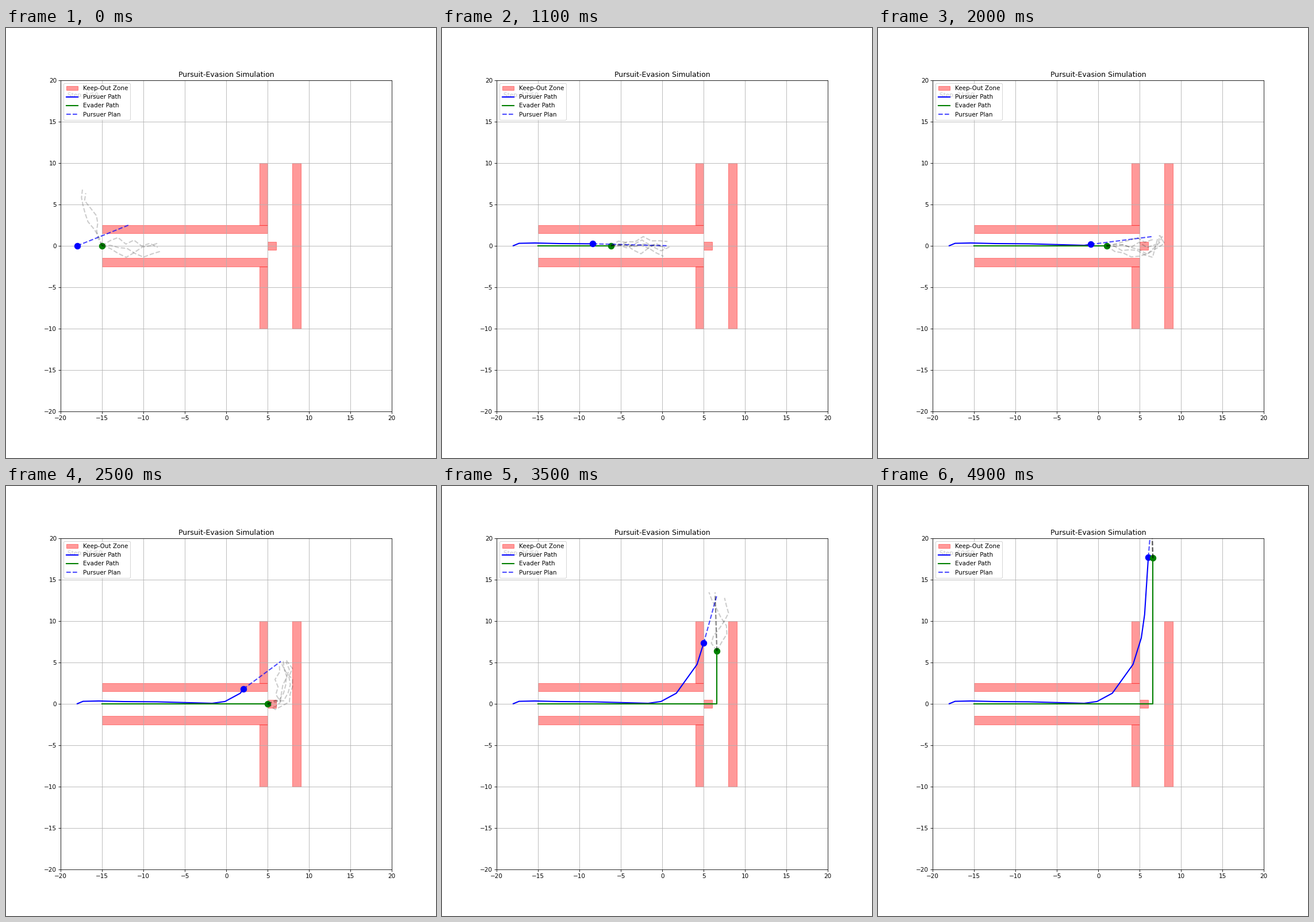
A matplotlib script that plays this animation: 748 px wide and 748 px high, repeating every 5 s.

```python
import numpy as np
import matplotlib.pyplot as plt
from matplotlib.animation import FuncAnimation
from matplotlib.patches import Rectangle

SIZE = 748
STEPS = 50
SPEED = 0.8
CORNER_STEP = 27      # the evader turns from the corridor into the shaft
OPEN_STEP = 37        # the evader nears the open end of the shaft
HORIZON = 8.4         # steps that both players look ahead
OPTIONS = 5

# Walls: x, y, width, height
ZONES = [(-15, 1.5, 20, 1), (-15, -2.5, 20, 1), (4, 2.5, 1, 7.5),
         (4, -10, 1, 7.5), (8, -10, 1, 20), (5, -0.5, 1, 1)]

# Pursuer key points: step, x, y
CHASE = np.array([
    (0, -18, 0), (1, -17.3, .29), (3, -15.4, .33), (6, -12.45, .26),
    (11, -8.38, .23), (19, -1.7, .05), (21, -.15, .27), (24, 1.7, 1.27),
    (27, 2.8, 2.8), (31, 4.2, 4.75), (36, 5.2, 7.95), (40, 5.6, 10.78),
    (49, 6.05, 17.72)])


def chase(steps):
    """Pursuer positions along its key points."""
    return np.column_stack([np.interp(steps, CHASE[:, 0], CHASE[:, k])
                            for k in (1, 2)])


def route(steps):
    """Evader positions: along the corridor, then up the shaft."""
    dist = SPEED * np.asarray(steps, float)
    turn = SPEED * CORNER_STEP
    return np.column_stack([np.minimum(dist, turn) - 15,
                            np.maximum(dist - turn, 0)])


def pursuer_goal(step):
    """The evader's expected position; the first guess swings wide."""
    return route([step + HORIZON])[0] + np.exp(-step) * np.array((-3.5, 2.5))


def drift(rng, count):
    """Sideways random walk between the walls, starting at zero."""
    side = np.zeros(count)
    for k in range(1, count):
        side[k] = np.clip(.9 * side[k - 1] + rng.uniform(-.7, .7), -1.4, 1.4)
    return side


def evader_options(step):
    """Possible escapes: wide in the corridor, straight in the open."""
    rng = np.random.default_rng(step)
    straight = np.clip((step - 22) // 4, 0, OPTIONS)
    options = []
    for k in range(OPTIONS):
        ahead = step + np.linspace(0, rng.uniform(7.8, 8.9), 8)
        upward = ahead >= CORNER_STEP
        base = route(ahead)
        if k < straight:
            side = .025 * (ahead - step)
        else:
            side = drift(rng, len(ahead))
            if step >= OPEN_STEP:
                side = abs(side)
        if step == 0 and k >= 3:
            # Before the walls begin, the way up is free as well.
            base = base[0] + (base - base[0])[:, ::-1]
            upward[:] = True
            side = abs(side) + .15 * ahead
        normal = np.where(upward[:, None], (-1, 0), (0, 1))
        options.append(base + normal * side[:, None])
    return options


fig, ax = plt.subplots(figsize=(10, 10), dpi=SIZE / 10)
shift_x, shift_y = -0.2 / SIZE, -1 / SIZE
fig.subplots_adjust(left=.125 + shift_x, right=.9 + shift_x,
                    bottom=.11 + shift_y, top=.88 + shift_y)
ax.set(xlim=(-20, 20), ylim=(-20, 20), aspect="equal",
       xticks=range(-20, 21, 5), yticks=range(-20, 21, 5),
       title="Pursuit-Evasion Simulation")
ax.grid(True)

for i, (x, y, w, h) in enumerate(ZONES):
    ax.add_patch(Rectangle((x, y), w, h, color="red", alpha=0.4,
                           label="_" if i else "Keep-Out Zone"))

pursuer_path, = ax.plot([], [], "b-", lw=2, label="Pursuer Path")
evader_path, = ax.plot([], [], "g-", lw=2, label="Evader Path")
pursuer_dot, = ax.plot([], [], "bo", ms=10)
evader_dot, = ax.plot([], [], "go", ms=10)
plan_line, = ax.plot([], [], "b--", lw=2, alpha=0.7, label="Pursuer Plan")
option_lines = [ax.plot([], [], "k--", lw=2, alpha=0.2)[0]
                for _ in range(OPTIONS)]
counter = ax.text(0.02, 0.95, "", transform=ax.transAxes)
ax.legend(loc="upper left")


def update(step):
    steps = np.arange(step + 1)
    pursuer, evader = chase(steps), route(steps)
    pursuer_path.set_data(*pursuer.T)
    evader_path.set_data(*evader.T)
    pursuer_dot.set_data(*pursuer[-1:].T)
    evader_dot.set_data(*evader[-1:].T)
    plan_line.set_data(*np.array([pursuer[-1], pursuer_goal(step)]).T)
    for line, points in zip(option_lines, evader_options(step)):
        line.set_data(*points.T)
    counter.set_text(f"Step: {step + 1}/{STEPS}")
    return [pursuer_path, evader_path, pursuer_dot, evader_dot, plan_line,
            *option_lines, counter]


anim = FuncAnimation(fig, update, frames=STEPS, interval=100, repeat=True,
                     repeat_delay=0, blit=False)
plt.show()
```
